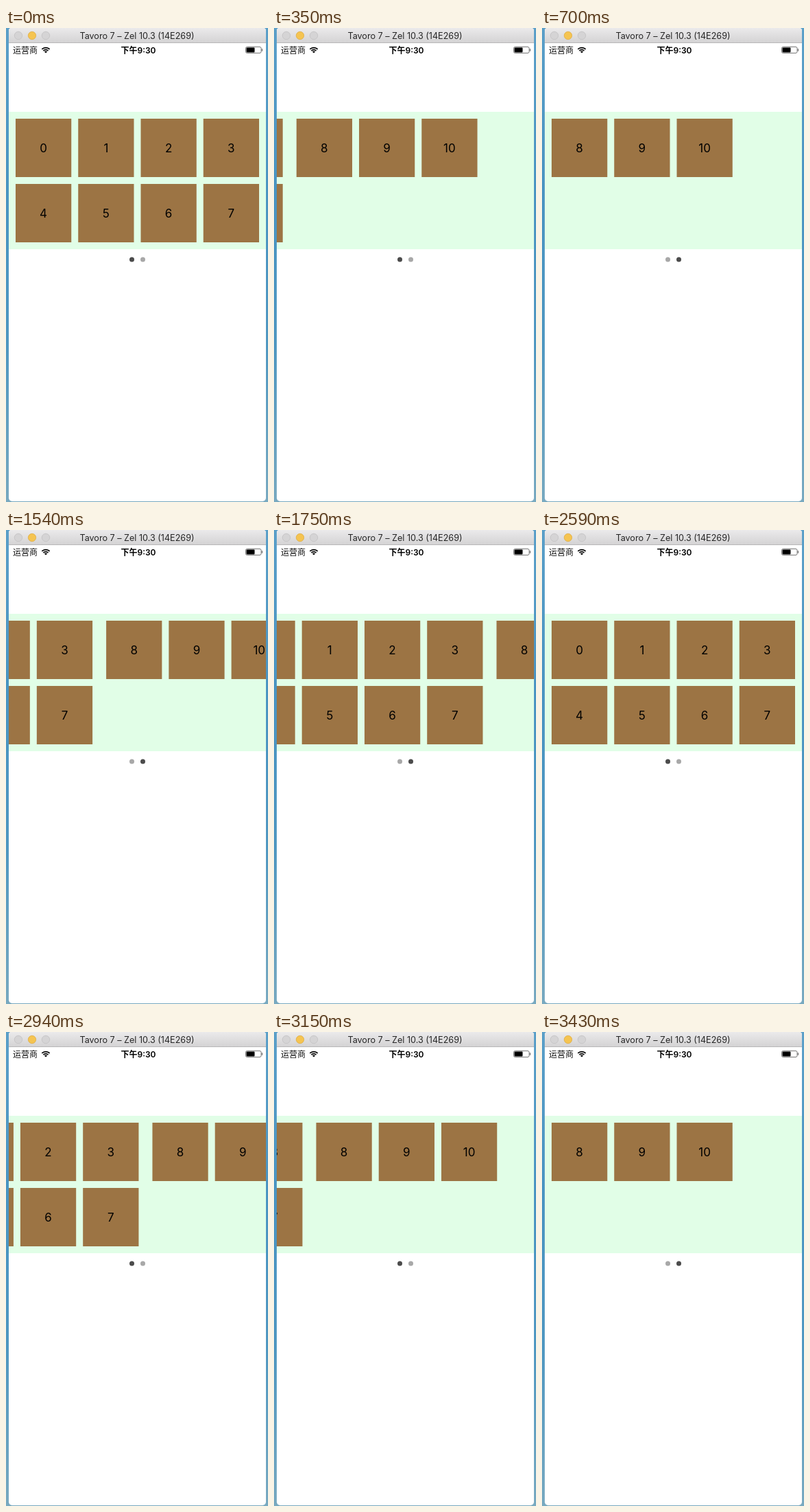
An HTML page with a canvas that plays this animation: 382 px wide and 690 px high, repeating every 3.71 s.

```html
<!DOCTYPE html>
<html lang="zh">
<head>
<meta charset="utf-8">
<title>Paged grid</title>
<style>
html, body { margin: 0; width: 100%; height: 100%; overflow: hidden; background: #fff; }
canvas { display: block; width: 382px; height: 690px; }
</style>
</head>
<body>
<canvas id="stage"></canvas>
<script>
const W = 382, H = 690, LOOP = 3710, STEP = 70;
const PAGE = 375, LEFT = 4;
const SANS = 'Inter, "Noto Sans CJK SC", "Noto Sans CJK", sans-serif';
const CJK = '"Noto Sans CJK SC", "Noto Sans CJK", sans-serif';

const canvas = document.getElementById('stage');
const ratio = window.devicePixelRatio || 1;
canvas.width = W * ratio;
canvas.height = H * ratio;
const ctx = canvas.getContext('2d');
ctx.scale(ratio, ratio);

// Exponential slowdown, from 1 at the start to exactly 0 at the end.
function decay(t, duration, tau) {
  if (t <= 0) return 1;
  if (t >= duration) return 0;
  const rest = Math.exp(-duration / tau);
  return (Math.exp(-t / tau) - rest) / (1 - rest);
}

function scrollAt(t) {
  if (t < 1470) return PAGE * (1 - decay(t, 560, 125));
  if (t < 2590) return PAGE * decay(t - 1470, 770, 163);
  const dragged = 63, release = 2870;
  if (t < release) return dragged * ((t - 2590) / (release - 2590)) ** 3;
  return PAGE - (PAGE - dragged) * decay(t - release, 560, 163);
}

function pageAt(t) {
  return (t >= 630 && t < 2240) || t >= 3430 ? 1 : 0;
}

function gradient(y0, y1, ...colors) {
  const g = ctx.createLinearGradient(0, y0, 0, y1);
  colors.forEach((c, i) => g.addColorStop(i / (colors.length - 1), c));
  return g;
}

function rect(x, y, w, h, fill) {
  ctx.fillStyle = fill;
  ctx.fillRect(x, y, w, h);
}

function roundRect(x, y, w, h, r) {
  ctx.beginPath();
  ctx.roundRect(x, y, w, h, r);
}

function disc(x, y, r, fill, stroke) {
  ctx.beginPath();
  ctx.arc(x, y, r, 0, Math.PI * 2);
  ctx.fillStyle = fill;
  ctx.fill();
  if (stroke) {
    ctx.strokeStyle = stroke;
    ctx.lineWidth = 0.8;
    ctx.stroke();
  }
}

function text(str, x, y, font, color = '#000', align = 'center') {
  ctx.font = font;
  ctx.fillStyle = color;
  ctx.textAlign = align;
  ctx.fillText(str, x, y);
}

function drawTitleBar() {
  rect(LEFT, 0, PAGE, 22, gradient(0, 22, '#ebeaeb', '#d3d2d3'));
  rect(LEFT, 21, PAGE, 1, '#b8b7b8');
  disc(18, 11, 5.7, '#d5d4d5', '#c3c2c3');
  disc(38, 11, 5.7, '#f5c451', '#dfae48');
  disc(58, 11, 5.7, '#d5d4d5', '#c3c2c3');
  text('Tavoro 7 – Zel 10.3 (14E269)', 191, 15.6, `12.6px ${SANS}`, '#262626');
}

function drawWifi(x, y) {
  ctx.strokeStyle = '#000';
  ctx.lineWidth = 1.7;
  for (const r of [5, 8]) {
    ctx.beginPath();
    ctx.arc(x, y, r, -Math.PI * 0.75, -Math.PI * 0.25);
    ctx.stroke();
  }
  ctx.beginPath();
  ctx.moveTo(x, y);
  ctx.arc(x, y, 2.9, -Math.PI * 0.75, -Math.PI * 0.25);
  ctx.fillStyle = '#000';
  ctx.fill();
}

function drawBattery() {
  roundRect(349.5, 27.5, 22.5, 9, 2);
  ctx.strokeStyle = '#555';
  ctx.lineWidth = 0.8;
  ctx.stroke();
  roundRect(350.5, 28.5, 12, 7, 1);
  ctx.fillStyle = '#000';
  ctx.fill();
  rect(372.8, 30.3, 1.1, 3.4, '#555');
}

function drawStatusBar() {
  text('运营商', 10, 36.6, `12px ${CJK}`, '#111', 'left');
  drawWifi(58, 36.6);
  text('下午9:30', 193, 36.5, `600 12px ${SANS}`);
  drawBattery();
}

function drawGrid(scroll) {
  ctx.save();
  ctx.beginPath();
  ctx.rect(LEFT, 122, PAGE, 200);
  ctx.clip();
  rect(LEFT, 122, PAGE, 200, '#e1fee7');
  for (let i = 0; i < 11; i++) {
    const page = Math.floor(i / 8), row = Math.floor(i % 8 / 4);
    const x = LEFT + 10 + page * PAGE + (i % 4) * 91.25 - scroll;
    const y = 132 + row * 95;
    rect(x, y, 81.25, 85, '#9c7444');
    text(i, x + 40.6, y + 48.8, `17px ${SANS}`);
  }
  ctx.restore();
}

function drawDots(page) {
  for (let i = 0; i < 2; i++) {
    disc(183.5 + i * 16, 337, 3.5, i === page ? '#4b4b4b' : '#a8a8a8');
  }
}

function draw(t) {
  rect(0, 0, W, H, gradient(0, H, '#5b9fc8', '#4a94c2', '#4f97c1', '#78a9c0'));
  ctx.save();
  roundRect(LEFT, 0, PAGE, 689, [4, 4, 5, 5]);
  ctx.clip();
  rect(LEFT, 0, PAGE, H, '#fff');
  drawTitleBar();
  drawStatusBar();
  drawGrid(scrollAt(t));
  drawDots(pageAt(t));
  ctx.restore();
}

const start = performance.now();
function tick() {
  const t = (performance.now() - start) % LOOP;
  draw(Math.floor(t / STEP) * STEP);
  requestAnimationFrame(tick);
}
tick();
</script>
</body>
</html>
```
